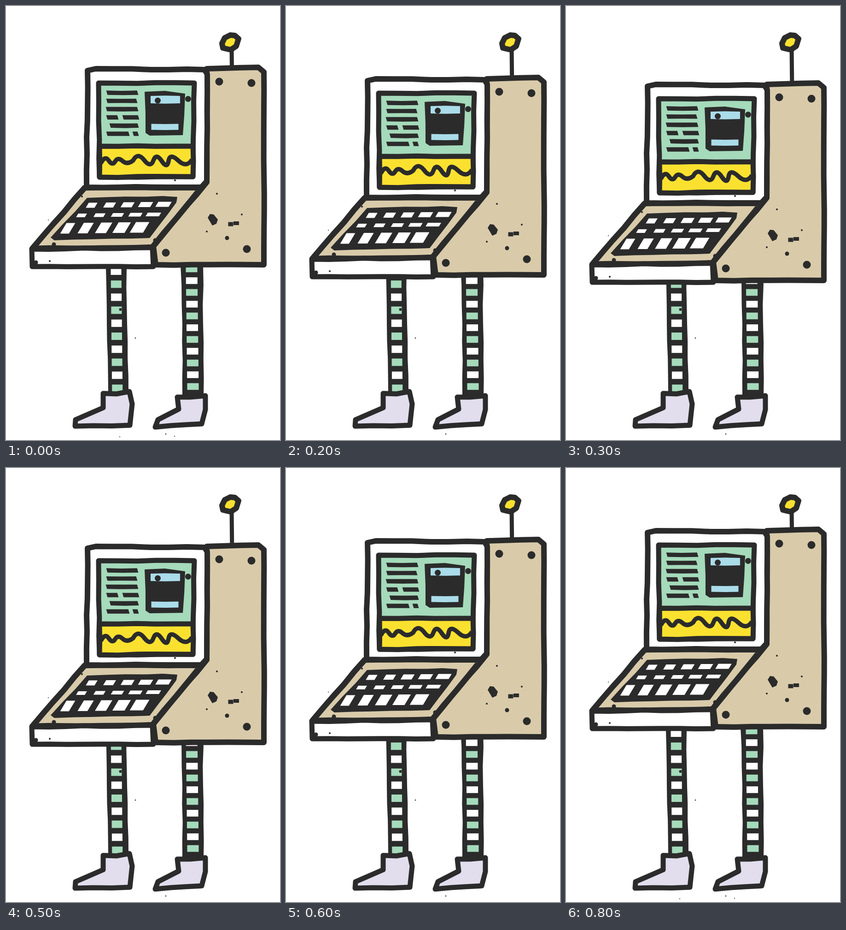
Recreate the animation shown at these times as an HTML page. Size 595x941 px, loop 0.9 s.

```html
<!DOCTYPE html>
<html lang="en">
<head>
<meta charset="utf-8">
<title>Bobbing computer</title>
<style>
  html, body { margin: 0; width: 100%; height: 100%; overflow: hidden; background: #fff; }
  svg { display: block; width: 100%; height: 100%; }
</style>
</head>
<body>
<svg viewBox="0 0 595 941" stroke-linejoin="round"><g id="still"></g><g id="box"></g></svg>
<script>
const INK = '#2b2b2b', TAN = '#d9cbaa', MINT = '#a5dabb', YELLOW = '#fbe12f',
      SKY = '#abdcea', LILAC = '#e2deee', WHITE = '#fff';
const [still, box] = ['still', 'box'].map(id => document.getElementById(id));
const parse = text => text.split(' ').map(p => p.split(',').map(Number));

let seed = 7;
const jitter = size => {
  seed = seed * 16807 % 2147483647;
  return (seed / 2147483647 - 0.5) * 2 * size;
};

function add(parent, tag, attrs) {
  const node = document.createElementNS('http://www.w3.org/2000/svg', tag);
  for (const key in attrs) node.setAttribute(key, attrs[key]);
  parent.append(node);
}

// Polygon through a few corners; long edges get a slight hand-drawn wobble.
function shape(parent, fill, corners, width = 0) {
  const pts = typeof corners === 'string' ? parse(corners) : corners;
  const drawn = pts.flatMap(([x, y], i) => {
    const [nx, ny] = pts[(i + 1) % pts.length];
    const n = Math.max(1, Math.round(Math.hypot(nx - x, ny - y) / 38));
    return Array.from({ length: n }, (_, k) => k
      ? [x + (nx - x) * k / n + jitter(1), y + (ny - y) * k / n + jitter(1)]
      : [x, y]);
  });
  add(parent, 'polygon', { points: drawn.join(' '), fill, stroke: INK, 'stroke-width': width });
}

function rect(parent, fill, cx, cy, w, h, slant = 0) {
  const [x, y, s] = [w / 2, h / 2, slant * h / 2];
  shape(parent, fill, [[cx - x + s, cy - y], [cx + x + s, cy - y],
                       [cx + x - s, cy + y], [cx - x - s, cy + y]]);
}

function dots(parent, r, centres) {
  for (const [cx, cy] of parse(centres)) add(parent, 'circle', { cx, cy, r, fill: INK });
}

function curve(parent, d, width) {
  add(parent, 'path', { d, fill: 'none', stroke: INK, 'stroke-width': width });
}

function drawAntenna() {
  curve(still, 'M490 92 L491 185', 9);
  shape(still, YELLOW, '469,81 475,69 487,63 497,64 505,71 500,87 488,95 471,91', 12);
}

function drawLeg(corners, count, top, pitch, cx, size, colours) {
  shape(still, INK, corners);
  for (let i = 0; i < count; i++) {
    rect(still, colours[i % 2], cx + i * 0.3, top + i * pitch, size, pitch * 0.57);
  }
}

function drawLegs() {
  drawLeg('217,569 262,569 263,690 266,838 222,838 219,690', 10, 575, 28.2, 239, 23, [WHITE, MINT]);
  drawLeg('379,562 428,562 428,690 429,846 383,846 383,690', 11, 570, 25.5, 403, 25, [MINT, WHITE]);
  shape(still, LILAC, '211,840 240,841 268,836 274,863 269,909 150,911 151,897 211,871', 11);
  shape(still, LILAC, '372,848 400,848 433,845 433,875 425,906 324,913 330,897 375,874', 11);
  dots(still, 3, '248.5,658');
  dots(still, 1.3, '281,720 347,928');
}

function drawCase() {
  shape(box, TAN, '436,136 470,135 548,133 560,143 560,561 325,561 320,521 436,382', 12);
  shape(box, TAN, '171,394 424,394 318,523 57,526', 12.5);
  shape(box, WHITE, '56,527 318,524 320,565 57,565', 11);
  shape(box, WHITE, '177,140 195,136 431,138 437,148 436,380 424,393 175,393', 12);
}

function drawScreen() {
  shape(box, MINT, '201,167 409,167 406,370 203,371', 11);
  shape(box, YELLOW, '203,304 406,304 406,370 203,371', 11);
  // Alternating crests and troughs, rounded between their midpoints.
  curve(box, `M206 341 Q215 323 223 335 T237 337 T253 336 T276 335
    Q286 316 300 334 T320 335 T338 336 T353 336 T374 335 T404 333`, 9.5);

  const rows = ['219,286', '219,284', '218,286', '219,243 254,288', '226,287', '219,267 276,287'];
  rows.forEach((row, i) => parse(row).forEach(([l, r]) =>
    rect(box, INK, (l + r) / 2, 188 + i * 17.8, r - l, 9.5, -0.3)));

  shape(box, INK, '301,186 345,184 389,190 384,280 312,281 303,275');
  rect(box, SKY, 346, 203, 64, 16);
  rect(box, SKY, 345, 262, 59, 13);
  dots(box, 6.5, '329.5,205 395.5,201.5');
}

function drawKeys() {
  shape(box, INK, '176,416 340,412 372,414 370,426 312,503 105,508 97,502');
  const keyRows = [{ x: 186, y: 432, h: 11 }, { x: 164, y: 454, h: 8 }, { x: 134, y: 482, h: 23 }];
  for (const { x, y, h } of keyRows) {
    for (let col = 0; col < 5; col++) {
      rect(box, WHITE, x + col * 39, y - col * 0.5, 19 + col * 2.5, h, -0.6 * -1);
    }
  }
}

function drawSpecks() {
  dots(box, 8.5, '463,164 533,167 523,527 347,535');
  shape(box, INK, '438,459 443,451 451,452 460,463 457,472 448,476');
  rect(box, INK, 488, 473, 11, 9);
  rect(box, INK, 500, 471, 12, 8);
  dots(box, 4.5, '480,503 65,556 324,508 104,517 325,553');
  dots(box, 2, '436,489 458,407 512,452 367,378 165,413 95,553');
  dots(box, 1, '247,934 366,933 92,464');
}

drawAntenna();
drawLegs();
drawCase();
drawScreen();
drawKeys();
drawSpecks();

// Nine held steps: sink evenly to the middle one, then rise again.
const STEPS = 9;
const frames = Array.from({ length: STEPS + 1 }, (_, i) => ({
  transform: `translate(0px, ${Math.max(0, 12 * (4 - Math.abs(4 - i)) - 2)}px)`,
  offset: i / STEPS,
  easing: 'step-end'
}));
box.animate(frames, { duration: STEPS * 100, iterations: Infinity });
</script>
</body>
</html>
```
